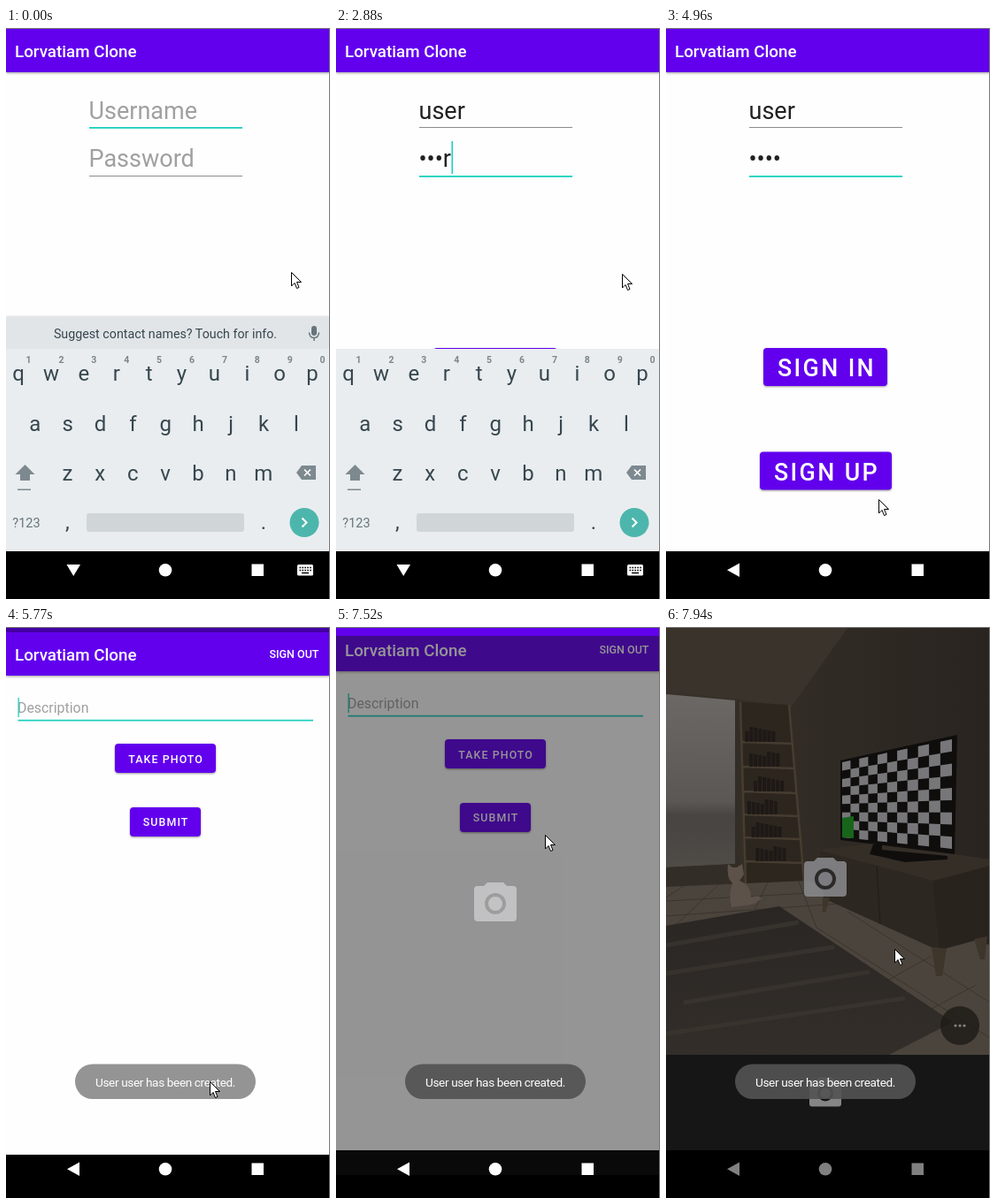
An HTML page that plays this animation: 366 px wide and 646 px high, repeating every 8 s.

```html
<!DOCTYPE html>
<html lang="en">
<head>
<meta charset="utf-8">
<title>Sign up flow</title>
<style>
  html, body { margin: 0; width: 100%; height: 100%; overflow: hidden; background: #000; }
  svg { display: block; width: 366px; height: 646px; font-family: Roboto, sans-serif; }
  .bar { fill: #6200ee; filter: drop-shadow(0 1px 1.5px #0006); }
  .btn rect { fill: #6200ee; filter: drop-shadow(0 1px 1px #0006); }
  .btn text { fill: #fff; font-weight: 500; text-anchor: middle; letter-spacing: .0893em; }
  .btn.pressed rect { fill: #8c46f2; }
  .title { font: 500 18.8px Roboto, sans-serif; fill: #fff; }
  .field { font-size: 27px; fill: #212121; }
  .hint { fill: #a0a0a0; }
  .line { fill: #8c8c8c; }
  .line.on, .caret { fill: #1ccfbe; }
  .mid { text-anchor: middle; }
  .key { font-size: 24px; fill: #37474f; text-anchor: middle; }
  .digit { font: 700 10.5px Roboto, sans-serif; fill: #7b878d; text-anchor: middle; }
  .icon { fill: #7d898f; }
</style>
</head>
<body>
<svg viewBox="0 0 366 646">
  <defs>
    <linearGradient id="sky" x2="0" y2="1">
      <stop offset="0" stop-color="#6b6865"/><stop offset=".62" stop-color="#5a5754"/>
      <stop offset=".7" stop-color="#474441"/><stop offset="1" stop-color="#4f4b47"/>
    </linearGradient>
    <linearGradient id="wall"><stop offset="0" stop-color="#383129"/><stop offset="1" stop-color="#292420"/></linearGradient>
    <linearGradient id="rug" x2="0" y2="1"><stop offset="0" stop-color="#2a2623"/><stop offset="1" stop-color="#332e2a"/></linearGradient>
    <path id="camera" fill-rule="evenodd" d="M-20-18H-13L-9-22H9L13-18H20Q24-18 24-14V18Q24 22 20 22H-20Q-24 22-24 18V-14Q-24-18-20-18ZM0-10A12 12 0 1 0 0 14A12 12 0 1 0 0-10ZM0-6A8 8 0 1 1 0 10A8 8 0 1 1 0-6Z"/>
  </defs>

  <g id="login">
    <path fill="#fefefe" d="M0 0H366V592H0Z"/>
    <path class="bar" d="M0 1H366V50H0Z"/>
    <text class="title" x="10" y="32.5">Lorvatiam Clone</text>
    <text class="field" id="name" x="93.5" y="102.5"></text>
    <text class="field" id="pass" x="93.5" y="157"></text>
    <rect class="line" id="nameLine" x="94" width="173"/>
    <rect class="line" id="passLine" x="94" width="173"/>
    <rect class="caret" id="loginCaret" width="1.6" height="37"/>
    <g class="btn" font-size="26.8"><rect x="110" y="362" width="140" height="43" rx="4"/><text x="181.5" y="394">SIGN IN</text></g>
    <g class="btn" id="signUp" font-size="26.8"><rect x="106" y="479.5" width="149" height="43" rx="4"/><text x="181.5" y="511.5">SIGN UP</text></g>
  </g>

  <g id="keyboard">
    <g id="strip">
      <path fill="#e1e5e8" d="M0 327H366V364H0Z" style="filter:drop-shadow(0 -1px 1px #0002)"/>
      <g font-size="14.25" fill="#37474f" class="mid">
        <text id="tipLeft" x="78" y="351"></text>
        <text id="tipMid" x="180" y="351"></text>
        <text id="tipRight" x="285" y="351"></text>
      </g>
      <rect x="345" y="337" width="6" height="11" rx="3" fill="#66747b"/>
      <path d="M342.5 344.5Q343 350.5 348 350.5T353.5 344.5M348 350V354" fill="none" stroke="#66747b" stroke-width="1.5"/>
    </g>
    <path fill="#e9edf0" d="M0 363H366V592H0Z"/>
    <g id="keys"></g>
    <path class="icon" d="M21.5 494L32.5 505H27V512H16V505H10.500ZM13 521.500H28V523H13Z"/>
    <path class="icon" d="M328 503L334 495H350V511H334Z"/>
    <path d="M337 499.500L344 506.500M344 499.500L337 506.500" stroke="#fff" stroke-width="1.7"/>
    <text x="23" y="565" class="mid" font-size="14.5" fill="#66747b">?123</text>
    <rect x="91" y="549" width="178" height="21" rx="3" fill="#d0d5d8"/>
    <circle cx="337" cy="559.500" r="16.500" fill="#4db6ac"/>
    <path d="M334.500 554.500L339.500 559.500L334.500 564.500" fill="none" stroke="#fff" stroke-width="2"/>
  </g>

  <path d="M0 592H366V646H0Z"/>

  <path id="dim" d="M0 1H366V592H0Z" opacity=".3"/>
  <g id="home">
    <path fill="#fefefe" d="M0 1H366V592H0Z"/>
    <path class="bar" d="M0 1H366V50H0Z"/>
    <text class="title" x="10" y="32.5">Lorvatiam Clone</text>
    <text x="297.500" y="30.300" font-size="12.5" font-weight="500" fill="#fff">SIGN OUT</text>
    <text class="hint" x="13" y="92" font-size="15.9">Description</text>
    <rect class="line on" x="13.500" y="99.800" width="333.500" height="1.700"/>
    <rect class="caret" id="homeCaret" x="13.500" y="75" width="1.300" height="22"/>
    <g class="btn" id="takePhoto" font-size="12.4"><rect x="123" y="127" width="114" height="33" rx="4"/><text x="180.600" y="148.500">TAKE PHOTO</text></g>
    <g class="btn" font-size="12.4"><rect x="140" y="199" width="80" height="33" rx="4"/><text x="180.600" y="220.300">SUBMIT</text></g>
  </g>

  <g id="cameraApp">
    <rect id="backdrop" width="366" fill="#161616"/>
    <g id="room">
      <path fill="url(#wall)" d="M0 1H366V484H0Z"/>
      <path fill="#3a332b" d="M0 1H205L142 90L80 82L0 73Z"/>
      <path fill="url(#sky)" d="M0 76L78 83V268L0 272Z"/>
      <path fill="#332d27" d="M78 83H84V290L0 294V272L78 268Z"/>
      <path fill="#2c261f" d="M84 85L139 88L156 288L90 292Z"/>
      <path id="shelves" fill="none" stroke="#463c30" stroke-width="2.500"/>
      <g id="books" fill="#1e1916"></g>
      <path fill="#4b443c" d="M0 294L160 287L366 360V484H0Z"/>
      <path fill="none" stroke="#3a342e" d="M0 310L180 300M0 327L210 312M20 293L0 306M60 291L12 336M115 289L100 320M150 288L170 340M170 340L366 465M205 322L366 425M250 400L300 372M300 432L350 405"/>
      <path fill="url(#rug)" d="M0 338L128 316L324 447L252 484H0Z"/>
      <path fill="none" stroke="#3d3731" stroke-width="5" opacity=".7" d="M0 360L150 334M0 392L190 362M20 425L230 390M0 460L270 420"/>
      <path fill="#352e27" d="M172 252L240 244L366 263V280L302 288Z"/>
      <path fill="#2d2721" d="M174 253L302 287L308 366L178 307Z"/>
      <path fill="#29231e" d="M302 287L366 270V350L308 366Z"/>
      <path fill="#3e352b" d="M177 306H185L180 323H177ZM300 362L317 364L312 395H305ZM348 353L363 350L360 376H355Z"/>
      <path fill="none" stroke="#211c18" d="M238 270L242 336"/>
      <path fill="#0f0e0d" d="M234 246H244V252L318 259V263L270 266L230 257ZM197 151L329 122L326 257L197 241Z"/>
      <g id="checks" fill="#77777a"></g>
      <path fill="#17651a" d="M199 216L212 214V239L199 238Z"/>
      <path fill="#5c5249" d="M70 268L75 272H80L86 268L88 280L83 287Q96 292 96 306Q104 302 108 307Q102 314 90 315L74 317Q70 304 75 290Q68 284 70 268Z"/>
      <circle cx="332" cy="451" r="22" fill="#1d1916" opacity=".8"/>
      <path d="M327 451h.01M332 451h.01M337 451h.01" stroke="#858280" stroke-width="3.200" stroke-linecap="round"/>
      <path fill="#161616" d="M0 484H366V592H0Z"/>
      <use href="#camera" fill="#858585" transform="translate(180 526) scale(.75)"/>
    </g>
    <g id="splash">
      <circle cx="180" cy="285" r="13" fill="#2b2a29"/>
      <use href="#camera" x="180" y="283" fill="#8b8b90" opacity=".85"/>
    </g>
  </g>

  <g id="nav" fill="#fff">
    <path id="back"/>
    <circle cx="180" cy="613.300" r="7.300"/>
    <path d="M277.500 606.500H291V620H277.500Z"/>
    <g id="imeIcon">
      <rect x="329" y="607" width="18" height="12.500" rx="1.500"/>
      <path d="M331.500 610.500H345M331.500 613.500H345" stroke="#000" stroke-width="1.600" stroke-dasharray="1.700 1.200"/>
      <path d="M334 616.500H342" stroke="#000" stroke-width="1.500"/>
    </g>
  </g>

  <g id="toast">
    <rect x="78" y="494.500" width="204" height="39.500" rx="19.750" fill="#535353" opacity=".91"/>
    <text x="180" y="519.500" class="mid" font-size="13.6" letter-spacing="-.37" fill="#fff">User user has been created.</text>
  </g>
  <path id="mouse" d="M.5.5V16L4 12.500L6.500 18.500L9 17.500L6.500 11.500H11.500Z" fill="#fff" stroke="#000"/>
  <path d="M0 .5H366M365.500 0V646" stroke="#777"/>
</svg>

<script>
const LOOP = 8000;
const $ = id => document.getElementById(id);
const show = (id, on) => $(id).style.display = on ? '' : 'none';
const fade = (id, value) => { $(id).style.opacity = value; show(id, value > 0); };
const shift = (id, x, y) => $(id).setAttribute('transform', `translate(${x} ${y})`);

// Each step is [start, ...values] and holds until the next one.
const steps = {
  name: [[0, ''], [550, 'u'], [670, 'us'], [820, 'use'], [1090, 'user']],
  pass: [[0, ''], [2060, 'u'], [2210, '•s'], [2360, '••e'], [2480, '•••r'], [4020, '••••']],
  tips: [[0, '', 'Suggest contact names? Touch for info.', ''], [820, 'used', 'use', 'uses'],
    [940, 'used', 'use', 'user'], [1090, 'used', 'user', 'users']],
  loginCaret: [[0, 0], [150, 1], [3000, 0], [3480, 1], [4020, 0], [4410, 1], [4960, 0], [5380, 1]],
  homeCaret: [[0, 1], [6310, 0], [6670, 1]],
  keyboard: [[0, 0, 1], [3900, 60, .8], [4020, 180, .3], [4140, 0, 0]],
  home: [[0, 0, 0], [5530, 41, .35], [5650, 15, .85], [5770, 5, 1], [5920, 2, 1], [6040, 0, 1]],
  toast: [[0, 0], [5650, .3], [5770, .68], [5920, .9], [6040, 1]],
  camera: [[0, 1, 592, 0], [7520, 10, 620, .45], [7660, 1, 605, .88], [7790, 1, 597, .97], [7940, 1, 592, 1]],
  nav: [[0, 1], [7660, .88], [7790, .7], [7940, .5]],
  mouse: [[0, 322, 276], [2880, 323, 278], [3000, 290, 345], [3120, 245, 420], [3240, 190, 490],
    [3360, 135, 550], [3480, 90, 592], [3600, 69, 606], [3750, 68, 606], [3900, 72, 600],
    [4020, 105, 550], [4140, 150, 463], [4290, 185, 415], [4410, 203, 383], [4690, 225, 460],
    [4810, 240, 532], [4960, 240, 533], [5110, 232, 515], [5530, 230, 514], [5920, 230, 510],
    [6040, 224, 495], [6160, 214, 474], [6310, 213, 400], [6430, 212, 300], [6550, 210, 200],
    [6670, 208, 147], [6820, 207, 148], [7400, 212, 170], [7520, 236, 235], [7660, 253, 289],
    [7790, 257, 340], [7940, 258, 364]]
};
const at = (key, t) => steps[key].findLast(s => s[0] <= t).slice(1);

function buildKeys() {
  const row = (chars, x, y, cls = 'key') =>
    [...chars].map((c, i) => `<text class="${cls}" x="${x + i * 36.9}" y="${y}">${c}</text>`).join('');
  $('keys').innerHTML = row('qwertyuiop', 14, 399) + row('1234567890', 25.5, 379, 'digit') +
    row('asdfghjkl', 32.7, 455.5) + row('zxcvbnm', 69.4, 512) + row(',', 69.4, 567) + row('.', 291, 567);
}

function buildRoom() {
  const levels = [130, 158, 186, 212, 238, 265];
  const left = y => 84 + (y - 85) * .03, right = y => 139 + (y - 88) * .085;
  $('shelves').setAttribute('d', 'M84 85L90 292M139 88L156 288' +
    levels.map(y => `M${left(y)} ${y}L${right(y)} ${y + 2}`).join(''));
  $('books').innerHTML = levels.flatMap((y, j) => [...Array(7)].map((_, i) => {
    const h = 12 + (i * 5 + j * 3) % 6;
    return `<rect x="${left(y) + 4 + i * 5 + j % 3 * 4}" y="${y - h}" width="4" height="${h}"/>`;
  })).join('');

  const cols = 11, rows = 9;
  const point = (i, j) => {
    const u = i / cols, v = j / rows, k = u * (.82 + .18 * u);
    const top = 153 - 26 * k, bottom = 238 + 13 * k;
    return `${199 + 124 * k} ${top + (bottom - top) * v}`;
  };
  let d = '';
  for (let i = 0; i < cols; i++)
    for (let j = i % 2; j < rows; j += 2)
      d += `M${point(i, j)}L${point(i + 1, j)}L${point(i + 1, j + 1)}L${point(i, j + 1)}Z`;
  $('checks').innerHTML = `<path d="${d}"/>`;
}

function setField(id, text, hint) {
  const el = $(id);
  el.textContent = text || hint;
  el.classList.toggle('hint', !text);
  return 94 + (text ? el.getComputedTextLength() : 0);
}

function setLine(id, y, on) {
  const el = $(id);
  el.classList.toggle('on', on);
  el.setAttribute('y', y);
  el.setAttribute('height', on ? 1.8 : 1);
}

function render(t) {
  const onPass = t >= 1500, typing = t < 4020;
  const nameEnd = setField('name', at('name', t)[0], 'Username');
  const passEnd = setField('pass', at('pass', t)[0], 'Password');
  setLine('nameLine', 112, !onPass);
  setLine('passLine', 167, onPass);
  $('loginCaret').setAttribute('x', onPass ? passEnd : nameEnd);
  $('loginCaret').setAttribute('y', onPass ? 128 : 73);
  show('loginCaret', at('loginCaret', t)[0]);

  const tips = at('tips', t);
  ['tipLeft', 'tipMid', 'tipRight'].forEach((id, i) => $(id).textContent = tips[i]);
  show('strip', !onPass);
  const [kbY, kbAlpha] = at('keyboard', t);
  shift('keyboard', 0, kbY);
  fade('keyboard', kbAlpha);
  show('imeIcon', typing);
  $('back').setAttribute('d', typing ? 'M68.500 607H84L76.200 620Z' : 'M69 613.300L83 605.500V621Z');
  $('signUp').classList.toggle('pressed', t >= 5260);

  const [homeY, homeAlpha] = at('home', t);
  shift('home', 0, homeY);
  fade('home', homeAlpha);
  show('dim', t >= 5530);
  show('homeCaret', at('homeCaret', t)[0]);
  $('takePhoto').classList.toggle('pressed', t >= 7120 && t < 7520);

  const [top, bottom, cameraAlpha] = at('camera', t);
  $('backdrop').setAttribute('y', top);
  $('backdrop').setAttribute('height', bottom - top);
  shift('splash', 0, bottom - 592);
  fade('cameraApp', cameraAlpha);
  show('room', t >= 7940);
  fade('nav', at('nav', t)[0]);
  fade('toast', at('toast', t)[0]);
  shift('mouse', ...at('mouse', t));
}

buildKeys();
buildRoom();
const start = performance.now();
function tick() {
  render((performance.now() - start) % LOOP);
  requestAnimationFrame(tick);
}
tick();
</script>
</body>
</html>
```
